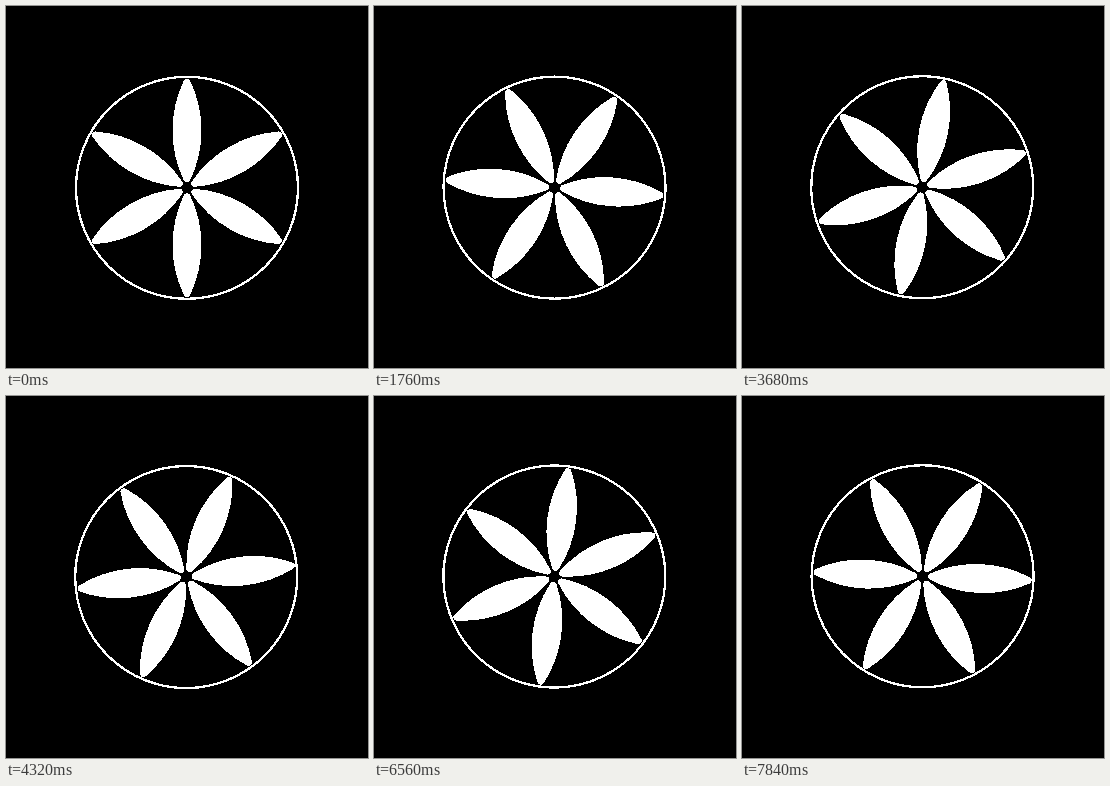
Animation, 362 px wide and 362 px high, one loop 8 s. Source, as an HTML page:

```html
<!DOCTYPE html>
<html lang="en">
<head>
<meta charset="utf-8">
<title>Turning rosette</title>
<style>
  html, body { margin: 0; width: 100%; height: 100%; overflow: hidden; background: #000; }
  svg { display: block; width: 100vw; height: 100vh; shape-rendering: crispEdges; }
  .ring { fill: none; stroke: #fff; stroke-width: 2.3; }
  .petal { fill: #fff; stroke: #fff; stroke-width: 7; stroke-linejoin: round; }
</style>
</head>
<body>
<svg viewBox="0 0 362 362">
  <g id="rosette">
    <!-- slightly off the pivot, so the ring wobbles as it turns -->
    <g id="flower" transform="translate(181 181.8)">
      <circle class="ring" r="111"/>
    </g>
  </g>
</svg>
<script>
  const STEP_MS = 160, STEPS = 50, DEGREES_PER_STEP = 3.107, PIVOT = 181;
  const PETALS = 6, INNER = 9, OUTER = 105.6, ARC = 112;

  const rosette = document.getElementById('rosette');
  const flower = document.getElementById('flower');

  for (let i = 0; i < PETALS; i++) {
    const petal = document.createElementNS(flower.namespaceURI, 'path');
    petal.setAttribute('class', 'petal');
    petal.setAttribute('d',
      `M0 ${-INNER}A${ARC} ${ARC} 0 0 1 0 ${-OUTER}A${ARC} ${ARC} 0 0 1 0 ${-INNER}Z`);
    petal.setAttribute('transform', `rotate(${i * 360 / PETALS})`);
    flower.append(petal);
  }

  // Redrawn at each step rather than composited, which keeps the edges hard.
  const start = performance.now();
  function draw(now) {
    const step = Math.floor(Math.max(0, now - start) / STEP_MS) % STEPS;
    rosette.setAttribute('transform', `rotate(${step * DEGREES_PER_STEP} ${PIVOT} ${PIVOT})`);
    requestAnimationFrame(draw);
  }
  draw(start);
</script>
</body>
</html>
```
